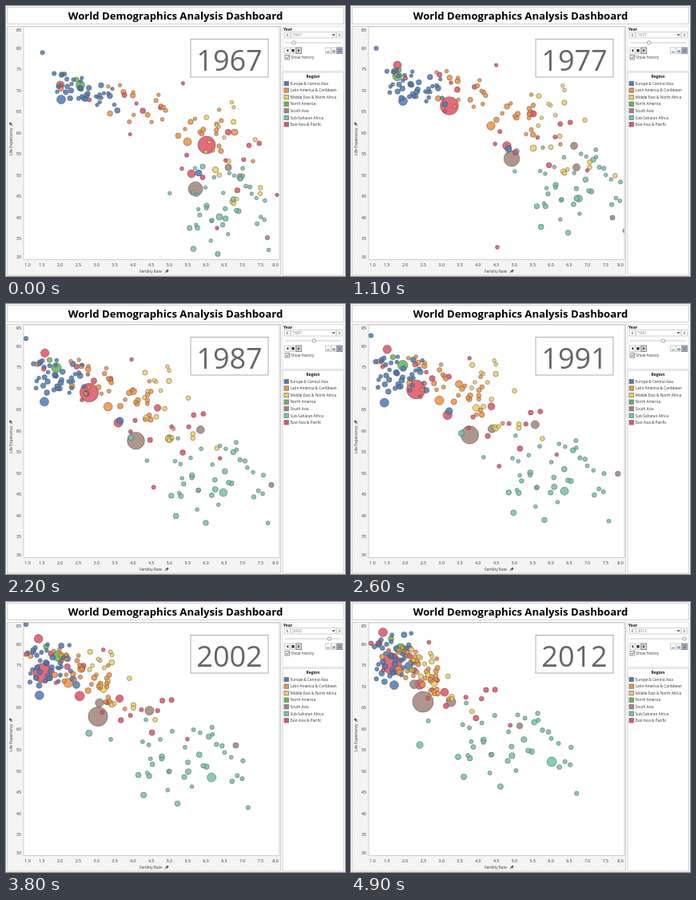
An HTML page for the animation above (5000 ms loop, 424 by 338 pixels).

```html
<!DOCTYPE html>
<html lang="en">
<head>
<meta charset="utf-8">
<title>World Demographics Analysis Dashboard</title>
<style>
  html, body { margin: 0; width: 100%; height: 100%; overflow: hidden; background: #fff; }
  svg { display: block; width: 424px; height: 338px; font-family: "Open Sans", "Noto Sans", sans-serif; fill: #333; }
  .bubble { stroke: #444; stroke-width: .6; stroke-opacity: .75; fill-opacity: .86; }
</style>
</head>
<body>
<svg id="stage" viewBox="0 0 424 338"></svg>
<script>
const stage = document.getElementById('stage');
const BLUE = '#4f7cb4', ORANGE = '#f09241', YELLOW = '#f0cf5c', GREEN = '#68b355',
      BROWN = '#a1857a', TEAL = '#75c1ae', RED = '#e05365';

function add(tag, attrs, text, parent = stage) {
  const el = document.createElementNS('http://www.w3.org/2000/svg', tag);
  for (const key in attrs) el.setAttribute(key, attrs[key]);
  if (text) el.textContent = text;
  return parent.appendChild(el);
}
const rect = (x, y, width, height, fill = '#fff', stroke = '#c6c6c6') =>
  add('rect', { x, y, width, height, fill, stroke, 'stroke-width': .8 });
const label = (x, y, text, size = 5, anchor = 'start', more = {}) =>
  add('text', { x, y, 'font-size': size, 'text-anchor': anchor, ...more }, text);
const path = (d, fill = '#444', more = {}) => add('path', { d, fill, ...more });
const line = (d, stroke = '#444') => path(d, 'none', { stroke, 'stroke-width': .8 });
const BOLD = { 'font-weight': 700, fill: '#111' };

// Frame, title and axes
rect(1.5, 1.5, 421, 21);
label(212, 17.3, 'World Demographics Analysis Dashboard', 13.15, 'middle', { ...BOLD, fill: '#000' });
rect(1.5, 25.5, 342, 311.5, '#f4f4f4');
rect(22, 26, 320, 291.5);
for (let v = 30; v <= 85; v += 5)
  label(19, Math.min(316, Math.max(32, 81 + (75 - v) * 5.3)), v, 5.2, 'end');
for (let v = 1; v <= 8; v += .5)
  label(Math.min(337, Math.max(27, 22 + (v - 1) * 45.6)), 326.3, v.toFixed(1), 5.2, 'middle');
const pin = transform => path('M-2.5 2.5L-.6.6M-1.7-.7L.8 1.8M-.8-.2L1-2L2.3-.7L.4 1Z', '#666',
  { stroke: '#444', 'stroke-width': .7, transform });
label(167, 333.6, 'Fertility Rate', 4.8);
pin('translate(201 332)');
label(0, 0, 'Life Expectancy', 4.8, 'start', { transform: 'translate(7.5 187) rotate(-90)' });
pin('translate(6 148) rotate(-90)');

// Year box inside the plot
rect(231, 41.5, 97, 47.5, '#fff', '#999');
const bigYear = label(279.5, 81, '1967', 36, 'middle', { fill: '#666' });

// Controls
rect(346, 25.5, 76.5, 56, '#fff', '#dcdcdc');
label(347, 31, 'Year', 5, 'start', BOLD);
rect(348.5, 32.5, 7, 7.5);
line('M353 34.5l-2 1.8l2 1.7');
rect(357, 32.5, 55, 7.5);
const smallYear = label(358.5, 38.1, '1967', 5, 'start', { fill: '#777' });
path('M407.5 35.3h4l-2 2.2z');
rect(413.5, 32.5, 7, 7.5);
line('M416 34.5l2 1.8l-2 1.7');
line('M349 46H419', '#bbb');
const knob = add('circle', { cx: 360, cy: 46, r: 2.2, fill: '#fff', stroke: '#888', 'stroke-width': .8 });
for (let i = 0; i < 3; i++) {
  const on = i > 1, x = 399.5 + i * 7.2, edge = on ? '#777' : '#c6c6c6';
  rect(348.5 + i * 7.2, 52, 6.8, 7.5, on ? '#d5d9e6' : '#fafafa', edge);
  rect(x, 52, 6.8, 7.5, on ? '#b9c0d4' : '#fafafa', edge);
  for (let n = 0; n <= i; n++) line(`M${x + 1.4} ${57.6 - n * 1.7}h4`, '#456');
}
path('M353.2 53.7v4l-2.4-2zM357.4 54h3.2v3.4h-3.2zM365.2 53.7v4l2.4-2z', '#333');
rect(349, 61.5, 5.5, 5.5, '#fff', '#777');
line('M350.2 64.3l1.3 1.4l2.3-3', '#333');
label(356.3, 66.2, 'Show history', 4.8);

// Legend
rect(346, 83, 76.5, 254);
label(384, 90.3, 'Region', 5, 'middle', BOLD);
[[BLUE, 'Europe & Central Asia'], [ORANGE, 'Latin America & Caribbean'],
 [YELLOW, 'Middle East & North Africa'], [GREEN, 'North America'], [BROWN, 'South Asia'],
 [TEAL, 'Sub-Saharan Africa'], [RED, 'East Asia & Pacific']].forEach(([color, name], i) => {
  rect(348, 94.3 + i * 8.55, 5.4, 5.4, color, '#777');
  label(355.5, 98.8 + i * 8.55, name, 4.7);
});

// Bubbles
const STEPS = [0, 4, 11, 22, 31, 38, 49];
const YEARS = [1967, 1971, 1977, 1987, 1996, 2002, 2012];
const MAIN = [0, 11, 31, 49];
const bubbles = [];
const mix = (a, b, p) => a + (b - a) * p;
let seed = 7;
const random = () => (seed = seed * 16807 % 2147483647) / 2147483647;
const bell = () => (random() + random() + random() - 1.5) * 2;

function keyed(values, step) {
  const keys = values.length > 4 ? STEPS : MAIN;
  let i = 0;
  while (i < keys.length - 2 && step > keys[i + 1]) i++;
  return mix(values[i], values[i + 1], (step - keys[i]) / (keys[i + 1] - keys[i]));
}
// A large country: radius from r0 to r1, x and y at the key steps
function country(color, r0, r1, xs, ys) {
  bubbles.push({ color, r0, r1, at: step => [keyed(xs, step), keyed(ys, step)] });
}
// Small countries scattered around the moving centre of their region;
// width, height and slope of the cloud go from a first to a last value
function region(color, count, xs, ys, width, height, slope) {
  for (let i = 0; i < count; i++) {
    const u = bell(), v = bell(), r = 2.2 + 1.3 * random() ** 2;
    bubbles.push({ color, r0: r, r1: r + .3, at: (step, p) => {
      const dx = u * mix(...width, p);
      return [Math.max(25, keyed(xs, step) + dx),
              keyed(ys, step) + dx * mix(...slope, p) + v * mix(...height, p)];
    } });
  }
}

country(RED, 11, 12.5, [251, 214, 123, 104, 53, 46, 51], [174, 139, 125, 111, 102, 89, 78]);
country(BROWN, 9, 13, [237, 201, 131, 90], [229, 191, 155, 125]);
country(GREEN, 5.5, 7, [93, 58, 67, 62], [99, 88, 73, 59]);
country(GREEN, 3, 3.5, [88, 60, 50, 50], [92, 80, 62, 46]);
country(RED, 5, 5.5, [68, 58, 41, 40], [99, 74, 51, 38]);
country(RED, 5, 6.3, [232, 195, 96, 86], [210, 175, 127, 103]);
country(BLUE, 5.5, 5.5, [69, 65, 34, 54], [117, 119, 125, 104]);
country(ORANGE, 5, 6, [227, 175, 89, 60], [170, 150, 111, 86]);
country(BROWN, 4, 6, [278, 279, 214, 125], [202, 175, 143, 125]);
country(BROWN, 4.2, 5.5, [293, 282, 141, 79], [214, 202, 141, 103]);
country(TEAL, 4, 6, [267, 285, 261, 251], [264, 241, 232, 200]);
country(ORANGE, 4, 5, [286, 225, 105, 77], [158, 134, 89, 75]);
country(RED, 3.7, 5, [278, 228, 158, 117], [158, 135, 126, 113]);
country(RED, 2.4, 2.8, [264, 183, 186, 108], [278, 302, 170, 98]);
country(BROWN, 2.8, 3.7, [327, 327, 336, 211], [290, 265, 195, 155]);
country(YELLOW, 3.8, 4.7, [262, 228, 133, 104], [205, 178, 114, 101]);
country(BLUE, 4, 4.7, [241, 197, 98, 72], [209, 179, 119, 80]);
country(TEAL, 3.2, 4.2, [246, 207, 115, 86], [201, 182, 155, 179]);

region(BLUE, 40, [93, 75, 51, 50], [103, 98, 82, 67], [19, 12], [9, 17], [.45, .2]);
region(ORANGE, 33, [205, 173, 105, 86], [137, 118, 93, 83], [52, 18], [13, 11], [.32, .5]);
region(YELLOW, 18, [290, 272, 157, 105], [178, 150, 98, 89], [32, 24], [34, 13], [.2, .6]);
region(RED, 16, [230, 190, 145, 105], [168, 140, 122, 98], [52, 45], [26, 17], [.5, .5]);
region(TEAL, 40, [277, 285, 248, 205], [252, 227, 212, 180], [28, 42], [24, 22], [.1, .2]);

// Small bubbles lie on top of large ones
add('rect', { x: 22, y: 26, width: 320, height: 291 }, '', add('clipPath', { id: 'plot' }));
const layer = add('g', { 'clip-path': 'url(#plot)' });
bubbles.sort((a, b) => b.r0 - a.r0);
for (const b of bubbles) b.el = add('circle', { class: 'bubble', fill: b.color }, '', layer);

const LOOP = 5000, HOLD = 100;
function draw(time) {
  const step = Math.floor(time % LOOP / HOLD), exact = keyed(YEARS, step);
  const year = Math.round(exact), p = (exact - 1967) / 45;
  bigYear.textContent = smallYear.textContent = year;
  knob.setAttribute('cx', 360 + (year - 1967) * 1.27);
  for (const b of bubbles) {
    const [x, y] = b.at(step, p);
    b.el.setAttribute('cx', x);
    b.el.setAttribute('cy', y);
    b.el.setAttribute('r', mix(b.r0, b.r1, p));
  }
}
const start = performance.now();
function tick() {
  draw(performance.now() - start);
  requestAnimationFrame(tick);
}
tick();
</script>
</body>
</html>
```
